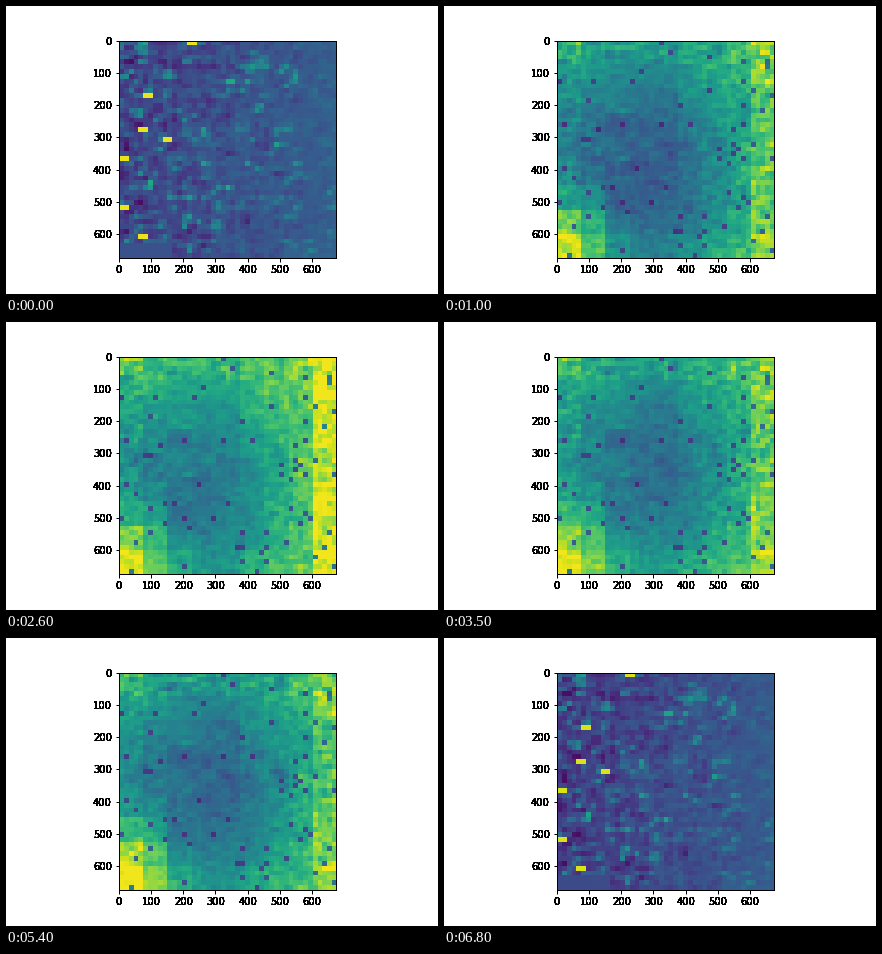
A matplotlib script that plays this animation: 432 px wide and 288 px high, repeating every 6.9 s.

```python
import numpy as np
import matplotlib.pyplot as plt
from matplotlib.animation import FuncAnimation

FRAMES, STEP_MS = 69, 100
CELLS, BLOCK, CELL_SIZE = 45, 5, 15
SIZE = CELLS * CELL_SIZE

rng = np.random.default_rng(12)
rows, cols = np.mgrid[0:CELLS, 0:CELLS]
block_y, block_x = rows // BLOCK, cols // BLOCK
depth = cols / (CELLS - 1)


def soft_noise(blur=0.6):
    """Unit-variance cell noise, smeared more along rows than columns."""
    n = rng.normal(size=(CELLS, CELLS))
    n = n + blur * np.roll(n, 1, 1) + 0.5 * blur * np.roll(n, 1, 0)
    return n / n.std()


def unit(cell, block):
    """Position from 0 to 1 that partly steps from block to block."""
    centre = block * BLOCK + BLOCK // 2
    return (0.5 * cell + 0.5 * centre) / (CELLS - 1)


u, w = unit(cols, block_x), unit(rows, block_y)
shared = soft_noise()
tiles = rng.normal(size=(9, 9))[block_y, block_x]
rim = np.abs(2 * u - 0.85)
last = block_x == 8
pits = rng.random((CELLS, CELLS)) < 0.015 + 0.04 * rim ** 2


def sparse_pose():
    """Dark grain with bright sparks, fading to an even tone on the right."""
    n = soft_noise(0.8)
    grain = 0.075 * n + 0.13 * np.maximum(n - 1, 0)
    v = 0.21 + 0.10 * depth + (1 - 0.7 * depth) * grain
    v[42:, :11] = 0.25
    for x, y in [(14, 0), (5, 11), (4, 18), (9, 20), (0, 24), (0, 34), (4, 40)]:
        v[y, x:x + 2] = 0.97
    return np.clip(v, 0.04, 1)


def bowl_pose(floor, cx, cy, edge_gain, corner_gain):
    """Basin around (cx, cy) with a warm right edge and lower left corner."""
    r = ((u - cx) / 0.6) ** 2 + ((w - cy) / 0.7) ** 2
    v = floor + 0.5 * (1 - np.exp(-1.2 * r))
    corner = np.exp(-block_x ** 2 / 2.2 - (block_y - 8) ** 2 / 3.5)
    v += corner_gain * corner + edge_gain * last
    v += 0.06 * np.exp(-((block_x - 8) ** 2 + (block_y - 8) ** 2) / 5)
    amp = 0.03 + 0.035 * rim ** 2 + 0.03 * (block_y == 0)
    v += 0.02 * tiles + amp * (0.8 * shared + 0.6 * soft_noise())
    return np.clip(np.where(pits, 0.4 * v, v), 0.04, 0.98)


start = sparse_pose()
poses = [
    (0, start),
    (10, bowl_pose(0.28, 0.37, 0.58, 0.12, 0.40)),
    (26, bowl_pose(0.38, 0.33, 0.60, 0.18, 0.35)),
    (35, bowl_pose(0.35, 0.42, 0.50, 0.10, 0.30)),
    (46, bowl_pose(0.25, 0.38, 0.62, 0.13, 0.45)),
    (54, bowl_pose(0.32, 0.40, 0.50, 0.10, 0.42)),
    (68, np.maximum(start - 0.025 * (1 - 0.4 * depth), 0.04)),
]


def field(i):
    for (t0, a), (t1, b) in zip(poses, poses[1:]):
        if i <= t1:
            return a + (b - a) * (i - t0) / (t1 - t0)


plt.rcParams.update({"font.family": "DejaVu Sans", "font.size": 10,
                     "axes.linewidth": 1, "xtick.major.width": 1,
                     "ytick.major.width": 1})
fig = plt.figure(figsize=(6, 4), dpi=72, facecolor="white")
fig.subplots_adjust(left=0.125, right=0.9, bottom=0.125, top=0.88)
ax = fig.add_subplot()
edge = SIZE - 0.5
image = ax.imshow(field(0), cmap="viridis", vmin=0, vmax=1,
                  interpolation="nearest", extent=(-0.5, edge, edge, -0.5))

ticks = range(0, SIZE, 100)
ax.set_xticks(ticks, [""] * len(ticks))
ax.set_yticks(ticks, [""] * len(ticks))

# Stacked labels give the heavy, hard-edged lettering.
x_place, x_va, x_ha = ax.get_xaxis_text1_transform(7)
y_place, y_va, y_ha = ax.get_yaxis_text1_transform(7)
for _ in range(20):
    for v in ticks:
        ax.text(v, 0, str(v), transform=x_place, va=x_va, ha=x_ha)
        ax.text(0, v, str(v), transform=y_place, va=y_va, ha=y_ha)


def update(i):
    image.set_data(field(i))
    return (image,)


anim = FuncAnimation(fig, update, frames=FRAMES, interval=STEP_MS,
                     repeat=True, repeat_delay=0, blit=False)
plt.show()
```
